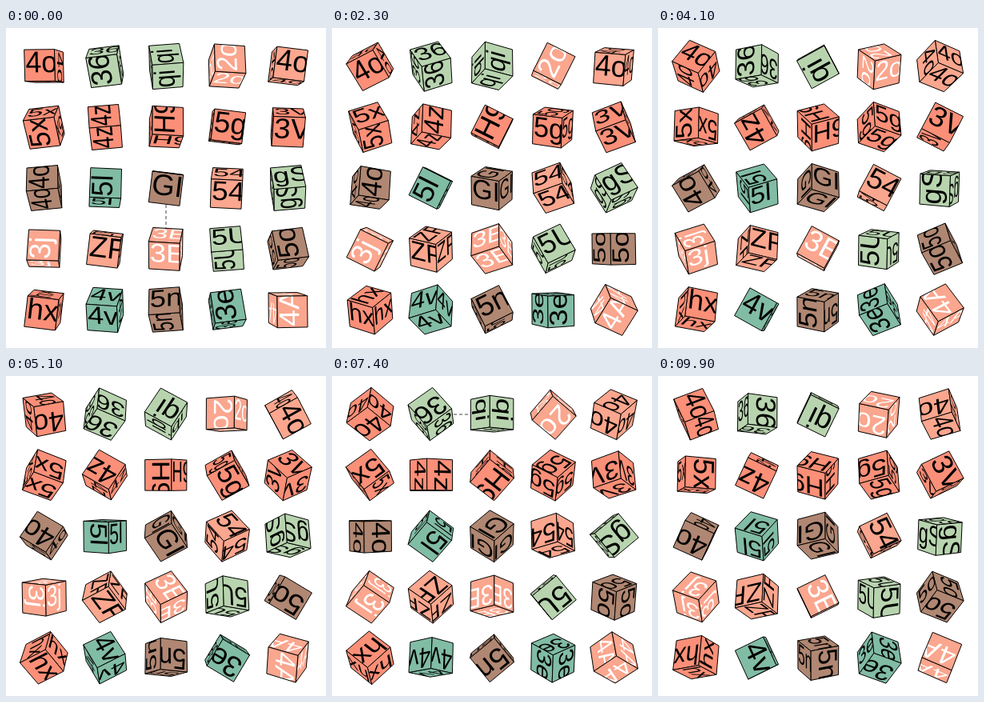
These frames come from a looping animation (400x400 px, 10 s). An HTML page with a canvas:

```html
<!DOCTYPE html>
<html>
<head>
<meta charset="utf-8">
<style>
html, body { margin: 0; width: 100%; height: 100%; overflow: hidden; background: #fff; }
canvas { display: block; width: 400px; height: 400px; }
</style>
</head>
<body>
<canvas id="stage" width="400" height="400"></canvas>
<script>
const ctx = document.getElementById('stage').getContext('2d');
const COUNT = 5, GAP = 76, SIZE = 38, HALF = SIZE / 2, EYE = 800;
const STEP_MS = 100, STEPS = 100;
const START = -7, SPEED = 3.06, PHASE = 1.2; // degrees, degrees per step, radians per diagonal

const LABELS = '4o 36 qi 2o 4o 5x 4z H9 5g 3V 4o 5l GI 54 gS 3j ZF 3E 5U 5o hx 4v 5n 3e 4A'.split(' ');
const SHADES = 'SGGLL SSSSS BTBLG LLLGB STBTL'.replace(/ /g, '');
const COLORS = { S: '#fb8f78', L: '#fba68e', G: '#b8d4af', T: '#81bca5', B: '#b08772' };
const WHITE_TEXT = ['2o', '3j', '3E', '4A'];

// Outward normal, text direction and text down direction of each face
const unit = (axis, sign = 1) => [0, 1, 2].map(i => i === axis % 3 ? sign : 0);
const FACES = [0, 1, 2].flatMap(k => [
  [unit(k), unit(k + 1), unit(k + 2)],
  [unit(k, -1), unit(k + 2), unit(k + 1)]
]);

function random(n) {
  const v = Math.sin(n * 12.9898 + 4.1) * 43758.5453;
  return v - Math.floor(v);
}

// Around the y axis by b, then around the x axis by a
function rotate([x, y, z], a, b) {
  const rx = x * Math.cos(b) + z * Math.sin(b);
  const rz = z * Math.cos(b) - x * Math.sin(b);
  return [rx, y * Math.cos(a) - rz * Math.sin(a), y * Math.sin(a) + rz * Math.cos(a)];
}

function project([x, y, z]) {
  const k = EYE / (EYE - z);
  return [200 + x * k, 200 + y * k];
}

function drawFace(center, [n, u, v], label, fill) {
  const at = (p, q) => center.map((c, i) => c + HALF * (n[i] + p * u[i] + q * v[i]));
  const mid = at(0, 0);
  if (n[2] * (EYE - mid[2]) - n[0] * mid[0] - n[1] * mid[1] <= 0) return;

  const path = new Path2D();
  for (const [p, q] of [[-1, -1], [1, -1], [1, 1], [-1, 1]]) path.lineTo(...project(at(p, q)));
  path.closePath();
  ctx.fillStyle = fill;
  ctx.fill(path);

  const [l, r, t, b] = [at(-1, 0), at(1, 0), at(0, -1), at(0, 1)].map(project);
  ctx.save();
  ctx.clip(path);
  ctx.transform((r[0] - l[0]) / SIZE, (r[1] - l[1]) / SIZE,
    (b[0] - t[0]) / SIZE, (b[1] - t[1]) / SIZE, ...project(mid));
  ctx.fillStyle = WHITE_TEXT.includes(label) ? '#fff' : '#000';
  ctx.fillText(label, 1.3 - HALF, 27.3 - HALF);
  ctx.restore();
  ctx.stroke(path);
}

// Now and then a dashed link joins two neighbours
function drawLinks(step) {
  ctx.strokeStyle = '#444';
  ctx.setLineDash([4, 3]);
  for (let i = 0; i < 2 * COUNT * (COUNT - 1); i++) {
    if (random(step * 41 + i) > 0.018) continue;
    const along = (i >> 1) % (COUNT - 1) - 2, across = Math.floor(i / 8) - 2;
    const ends = [[along, across], [along + 1, across]];
    ctx.beginPath();
    for (const end of ends) {
      const [x, y] = i % 2 ? end : end.reverse();
      ctx.lineTo(200 + x * GAP, 200 + y * GAP);
    }
    ctx.stroke();
  }
  ctx.setLineDash([]);
}

function draw(step) {
  ctx.fillStyle = '#fff';
  ctx.fillRect(0, 0, 400, 400);
  ctx.font = '36px "Liberation Sans", Arial, sans-serif';
  ctx.lineJoin = 'round';
  ctx.lineWidth = 1;
  drawLinks(step);

  ctx.strokeStyle = '#000';
  const turn = (START + SPEED * step) * Math.PI / 180;
  LABELS.forEach((label, i) => {
    const col = i % COUNT, row = Math.floor(i / COUNT);
    const center = [(col - 2) * GAP, (row - 2) * GAP, 0];
    const tilt = turn + PHASE * (row + col);
    for (const face of FACES) {
      drawFace(center, face.map(axis => rotate(axis, tilt, turn)), label, COLORS[SHADES[i]]);
    }
  });
}

const start = performance.now();
function tick() {
  draw(Math.floor((performance.now() - start) / STEP_MS) % STEPS);
  requestAnimationFrame(tick);
}
tick();
</script>
</body>
</html>
```
